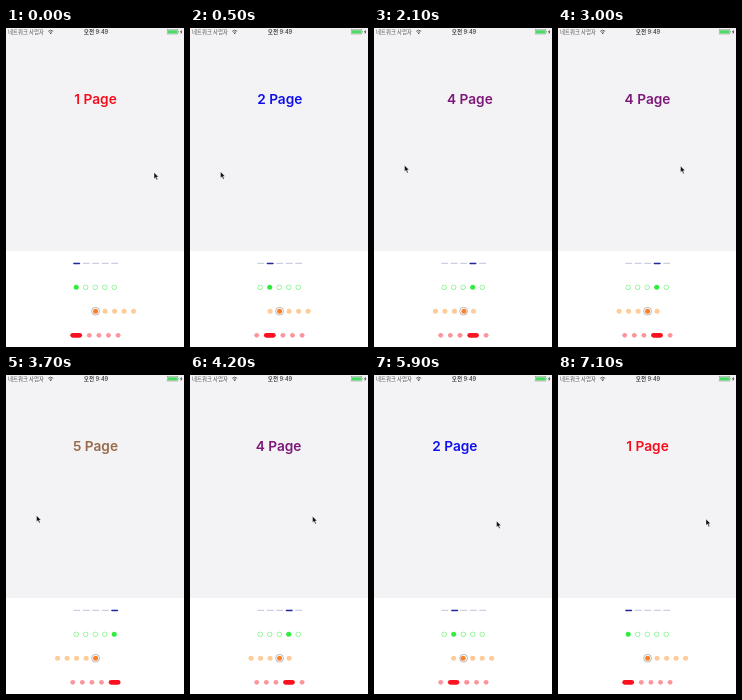
Recreate the animation shown at these times as an HTML page with a canvas. Size 178 by 319 pixels, loop 8000 ms.

```html
<!DOCTYPE html>
<html lang="ko">
<head>
<meta charset="utf-8">
<style>
html, body { margin: 0; width: 100%; height: 100%; overflow: hidden; background: #fff; }
canvas { display: block; width: 100%; height: 100%; }
</style>
</head>
<body>
<canvas></canvas>
<script>
const W = 178, H = 319, LOOP = 8000, STEP = 100;
const canvas = document.querySelector('canvas');
const ctx = canvas.getContext('2d');
const pages = ['#f60d1c', '#1010ec', '#2cfa38', '#7c1878', '#966a4a'];

// Four swipes forward, then four back
const swipeStarts = [23, 1175, 1832, 3130, 3807, 4757, 5652, 6519];
const lastSwipe = swipeStarts.length - 1;

const clamp = k => Math.min(1, Math.max(0, k));
const smooth = k => k * k * (3 - 2 * k);
const mix = (a, b, k) => a + (b - a) * k;
const mixAll = (a, b, k) => a.map((v, i) => mix(v, b[i], k));
const blend = (a, b, k) => `rgb(${mixAll(a, b, k).map(Math.round)})`;
const isForward = i => i <= lastSwipe / 2;

// A steady drag, then an exponential settle
function swipeProgress(u) {
  if (u <= 0) return 0;
  if (u < 111) return u * .6 / 111;
  return u > 480 ? 1 : 1 - .4 * Math.exp((111 - u) / 65);
}

const pageAt = t => swipeStarts.reduce((p, start, i) =>
  p + (isForward(i) ? 1 : -1) * swipeProgress(t - start), 0);

// Both ends of the pointer's stroke; its height drifts slowly
function stroke(i) {
  const height = t => 141.5 + 4.5 * Math.cos((t - 5700) / 1050);
  const start = swipeStarts[i];
  const right = i % lastSwipe ? 122.5 : 148;
  const [fromX, toX] = isForward(i) ? [right, 30.5] : [30.5, right];
  return { from: [fromX, height(start)], to: [toX, height(start + 200)] };
}

// Each stroke follows its swipe; the pointer returns just before the next one
function pointerAt(t) {
  return swipeStarts.reduce((position, start, i) => {
    const { from, to } = stroke(i);
    const ready = mixAll(position, from, smooth(clamp((t - start + 230) / 100)));
    return mixAll(ready, to, smooth(clamp((t - start) / 200)));
  }, stroke(0).from);
}

function disc(x, y, r, color) {
  ctx.fillStyle = color;
  ctx.beginPath();
  ctx.arc(x, y, r, 0, 7);
  ctx.fill();
}

function ring(x, y, r, color, width, from = 0, to = 7) {
  ctx.strokeStyle = color;
  ctx.lineWidth = width;
  ctx.beginPath();
  ctx.arc(x, y, r, from, to);
  ctx.stroke();
}

function pill(x, y, w, h, color, r = h / 2) {
  ctx.fillStyle = color;
  ctx.beginPath();
  ctx.roundRect(x, y, w, h, r);
  ctx.fill();
}

function label(text, x, y, font, color, align = 'center') {
  ctx.font = font;
  ctx.fillStyle = color;
  ctx.textAlign = align;
  ctx.fillText(text, x, y);
}

function polygon(points, fill) {
  ctx.beginPath();
  points.forEach(([x, y]) => ctx.lineTo(x, y));
  ctx.closePath();
  ctx.fillStyle = fill;
  ctx.fill();
}

function statusBar() {
  label('네트워크 사업자', 2, 6.1, '5.4px "Noto Sans CJK KR", "Noto Sans CJK", sans-serif', '#555', 'left');
  label('오전 9:49', 90, 6.1, '600 5.6px Inter, "Noto Sans CJK KR", sans-serif', '#444');
  for (const r of [1.8, 3.4]) ring(44.7, 5.7, r, '#444', .8, -2.4, -.74);
  disc(44.7, 5.4, .7, '#444');
  ctx.strokeStyle = '#8a8a8a';
  ctx.lineWidth = .5;
  ctx.strokeRect(161.2, 1.6, 10.6, 4.4);
  pill(161.8, 2.2, 9.4, 3.2, '#4cd964', .4);
  pill(172.2, 3, .7, 1.6, '#8a8a8a', .3);
  polygon([[175.6, 1.4], [174, 4.2], [175.1, 4.2], [174.6, 6.4], [176.4, 3.4], [175.3, 3.4]], '#333');
}

function indicators(page) {
  const gap = 9.5;
  let x = 64.3;
  pages.forEach((_, i) => {
    const k = clamp(1 - Math.abs(i - page));
    const w = 4.8 + 7 * k;
    pill(67.2 + gap * i, 234.8, 7, 1.3, '#cccee2');
    disc(70.2 + gap * i, 259.2, 2.5, blend([100, 240, 108], [48, 236, 62], k));
    if (k < 1) disc(70.2 + gap * i, 259.2, 1.95 * (1 - k), '#fff');
    disc(89.6 + gap * (i - page), 283.2, 2.5, blend([253, 204, 153], [250, 128, 40], k));
    pill(x, 304.9, w, 4.8, blend([250, 150, 156], [250, 16, 30], k));
    x += w + 4.8;
  });
  pill(67.2 + gap * page, 234.7, 7, 1.5, '#24289a');
  ring(89.6, 283.2, 3.9, '#a89a98', .7);
}

function arrow([x, y]) {
  const shape = [[0, 0], [0, 6.3], [1.5, 5], [2.6, 7.6], [3.7, 7.1], [2.6, 4.7], [4.5, 4.5]];
  polygon(shape.map(([dx, dy]) => [x + dx, y + dy]), '#111');
  ctx.strokeStyle = '#fff';
  ctx.lineWidth = .4;
  ctx.stroke();
}

function draw(t) {
  const page = pageAt(t);
  ctx.setTransform(canvas.width / W, 0, 0, canvas.height / H, 0, 0);
  ctx.fillStyle = '#fff';
  ctx.fillRect(0, 0, W, H);
  ctx.fillStyle = '#f3f2f5';
  ctx.fillRect(0, 0, W, 223);
  statusBar();
  pages.forEach((color, i) =>
    label(`${i + 1} Page`, 89.5 + W * (i - page), 76, '600 13.7px Inter, sans-serif', color));
  indicators(page);
  arrow(pointerAt(t));
}

function frame(now) {
  const ratio = devicePixelRatio || 1;
  const w = Math.round(innerWidth * ratio), h = Math.round(innerHeight * ratio);
  if (canvas.width !== w || canvas.height !== h) {
    canvas.width = w;
    canvas.height = h;
  }
  draw(Math.floor(now % LOOP / STEP) * STEP);
  requestAnimationFrame(frame);
}
requestAnimationFrame(frame);
</script>
</body>
</html>
```
